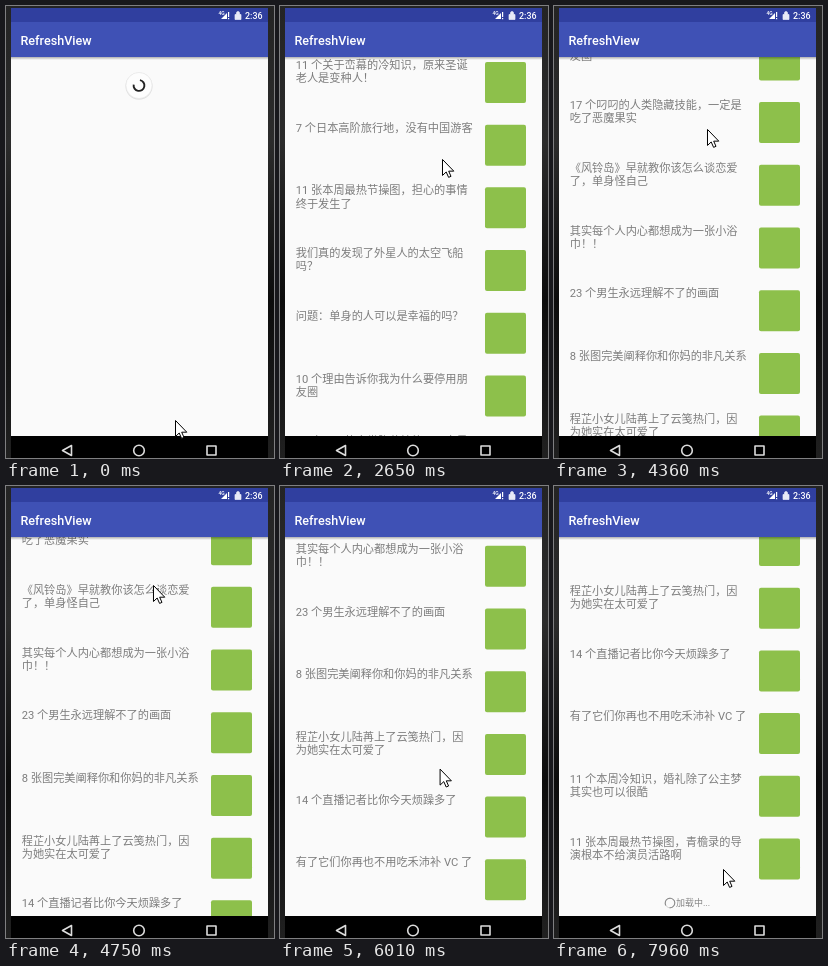
An HTML page that plays this animation: 268x452 px, repeating every 8 s.

```html
<!DOCTYPE html>
<html lang="zh-CN">
<head>
<meta charset="utf-8">
<title>RefreshView</title>
<style>
html, body { margin: 0; width: 100%; height: 100%; overflow: hidden; background: #1b1b1b; }
svg { display: block; width: 268px; height: 452px; }
text { font-family: Roboto, "Noto Sans CJK SC", "Noto Sans CJK", sans-serif; }
.row { font-size: 11.2px; fill: #7d7d7d; }
.bar { font-weight: 500; fill: #fff; }
.nav { fill: none; stroke: #dcdcdc; stroke-width: 1.6; stroke-linejoin: round; }
</style>
</head>
<body>
<svg viewBox="0 0 268 452">
  <defs>
    <clipPath id="view"><rect x="5" y="51" width="257" height="379"/></clipPath>
    <linearGradient id="shade" x2="0" y2="1">
      <stop stop-color="#000" stop-opacity=".3"/>
      <stop offset="1" stop-color="#000" stop-opacity="0"/>
    </linearGradient>
    <linearGradient id="edge" x2="0" y2="1">
      <stop stop-color="#242424"/><stop offset=".3" stop-color="#2b2b2b"/>
      <stop offset=".65" stop-color="#0c0c0c"/><stop offset="1" stop-color="#202020"/>
    </linearGradient>
  </defs>
  <rect width="268" height="452" fill="url(#edge)"/>
  <rect x="5" y="51" width="257" height="379" fill="#fafafa"/>

  <g clip-path="url(#view)">
    <g id="list">
      <g id="footer">
        <circle cx="116" cy="1071" r="4.8" fill="none" stroke="#d2d2d2"/>
        <circle id="more" r="4.8" fill="none" stroke="#858585" pathLength="360" transform="translate(116 1071) rotate(150)"/>
        <text x="122" y="1074" font-size="9" fill="#858585">加载中...</text>
      </g>
    </g>
    <g id="loader">
      <circle r="13.6" cy=".6" fill="#000" opacity=".1"/>
      <circle r="13" fill="#fdfdfd" stroke="#e6e6e6" stroke-width=".6"/>
      <circle id="spin" r="5.4" fill="none" stroke="#222" stroke-width="1.9" pathLength="360" stroke-dasharray="270 90"/>
    </g>
    <rect x="5" y="51" width="257" height="3" fill="url(#shade)"/>
  </g>

  <rect x="5" y="2" width="257" height="14" fill="#303f9f"/>
  <rect x="5" y="16" width="257" height="35" fill="#3f51b5"/>
  <text class="bar" x="14.5" y="39" font-size="12.6">RefreshView</text>
  <text class="bar" x="239" y="12.6" font-size="8.9">2:36</text>
  <text class="bar" x="212.5" y="9" font-size="5">4G</text>
  <path d="M215 13H221V7ZM222 6h1.2v5H222zM222 12h1.2v1.2H222z" fill="#fff"/>
  <path d="M229 8.5h6v5h-6zM230.5 8.5V7a1.5 1.5 0 0 1 3 0v1.5" fill="#e8eaf6" stroke="#e8eaf6" stroke-width=".7"/>

  <rect x="5" y="430" width="257" height="22" fill="#000"/>
  <g class="nav">
    <path d="M65.5 439.5v10l-9-5z"/>
    <circle cx="133" cy="444.5" r="5.3"/>
    <rect x="201" y="440" width="9" height="9"/>
  </g>
  <path id="cursor" d="M.5.5V16.5L4.2 13 6.6 18.4 9 17.4 6.7 12.2H11.8Z" fill="#fff" stroke="#000"/>
</svg>
<script>
const LOOP = 8000, PITCH = 62.7, FIRST = 69;

const titles = [
  "11 个关于峦幕的冷知识，原来圣诞|老人是变种人！",
  "7 个日本高阶旅行地，没有中国游客",
  "11 张本周最热节操图，担心的事情|终于发生了",
  "我们真的发现了外星人的太空飞船|吗？",
  "问题：单身的人可以是幸福的吗？",
  "10 个理由告诉你我为什么要停用朋|友圈",
  "17 个叼叼的人类隐藏技能，一定是|吃了恶魔果实",
  "《风铃岛》早就教你该怎么谈恋爱|了，单身怪自己",
  "其实每个人内心都想成为一张小浴|巾！！",
  "23 个男生永远理解不了的画面",
  "8 张图完美阐释你和你妈的非凡关系",
  "程芷小女儿陆苒上了云笺热门，因|为她实在太可爱了",
  "14 个直播记者比你今天烦躁多了",
  "有了它们你再也不用吃禾沛补 VC 了",
  "11 个本周冷知识，婚礼除了公主梦|其实也可以很酷",
  "11 张本周最热节操图，青檐录的导|演根本不给演员活路啊"
];

// The screen refreshes in bursts: start, end, number of steps
const bursts = [
  [120, 1110, 8], [1230, 1470, 3], [1870, 2800, 8], [2920, 3940, 9],
  [4090, 5050, 8], [5170, 6130, 8], [6250, 7180, 8], [7330, 7960, 6]
];

// time, x, y
const pointer = [
  [400, 169, 414], [1110, 186, 446], [1230, 186, 449], [1470, 187, 453],
  [1869, 187, 455], [1870, 178, 428], [2403, 165, 175], [2535, 163, 168],
  [2667, 162, 153], [2800, 160, 110], [2920, 159, 82], [3175, 158, 85],
  [3685, 159, 389], [3812, 159, 382], [4364, 153, 123], [4501, 148, 99],
  [5170, 143, 99], [5719, 160, 375], [6383, 159, 151], [6516, 157, 108],
  [6650, 157, 105], [7180, 169, 383]
];

// time, distance
const scroll = [
  [2535, 0], [2667, 10], [2800, 52], [2920, 77], [3050, 90], [3175, 96.4],
  [3812, 96.4], [4364, 346], [4501, 385], [4638, 404], [4775, 415],
  [4912, 421], [5719, 421], [6383, 631.5], [6516, 654]
];

const $ = id => document.getElementById(id);

function add(tag, attrs, text = "") {
  const el = document.createElementNS("http://www.w3.org/2000/svg", tag);
  for (const k in attrs) el.setAttribute(k, attrs[k]);
  el.textContent = text;
  $("list").append(el);
}

titles.forEach((title, i) => {
  const y = FIRST + i * PITCH;
  title.split("|").forEach((line, j) =>
    add("text", { class: "row", x: 15.7, y: y + 4.1 + j * 13.2 }, line));
  add("rect", { x: 205, y: y - 3, width: 41, height: 41, rx: 2, fill: "#8dc04b" });
});

function snap(t) {
  let r = 0;
  for (const [a, b, n] of bursts) {
    const step = (b - a) / (n - 1);
    if (t >= a) r = a + step * Math.min(n - 1, Math.floor((t - a) / step + .15));
  }
  return r;
}

function at(keys, t) {
  const i = keys.findIndex(k => k[0] > t);
  if (i < 0) return keys[keys.length - 1].slice(1);
  if (!i) return keys[0].slice(1);
  const a = keys[i - 1], b = keys[i], p = (t - a[0]) / (b[0] - a[0]);
  return a.slice(1).map((v, k) => v + (b[k + 1] - v) * p);
}

function draw(now) {
  const t = snap(now % LOOP);
  const [x, y] = at(pointer, t), [s] = at(scroll, t);
  const size = Math.max(0, Math.min(1, 1 - (t - 680) / 280));
  $("cursor").setAttribute("transform", `translate(${x} ${y})`);
  $("list").setAttribute("transform", `translate(0 ${-s})`);
  $("list").style.display = t < 680 ? "none" : "";
  $("loader").setAttribute("transform", `translate(133 79.5) scale(${size})`);
  $("spin").setAttribute("transform", `rotate(${t * .6 - 80})`);
  const arc = 270 + 75 * (t / 760 % 1);
  $("more").setAttribute("stroke-dasharray", `${arc} ${360 - arc}`);
  requestAnimationFrame(draw);
}
draw(0);
</script>
</body>
</html>
```
